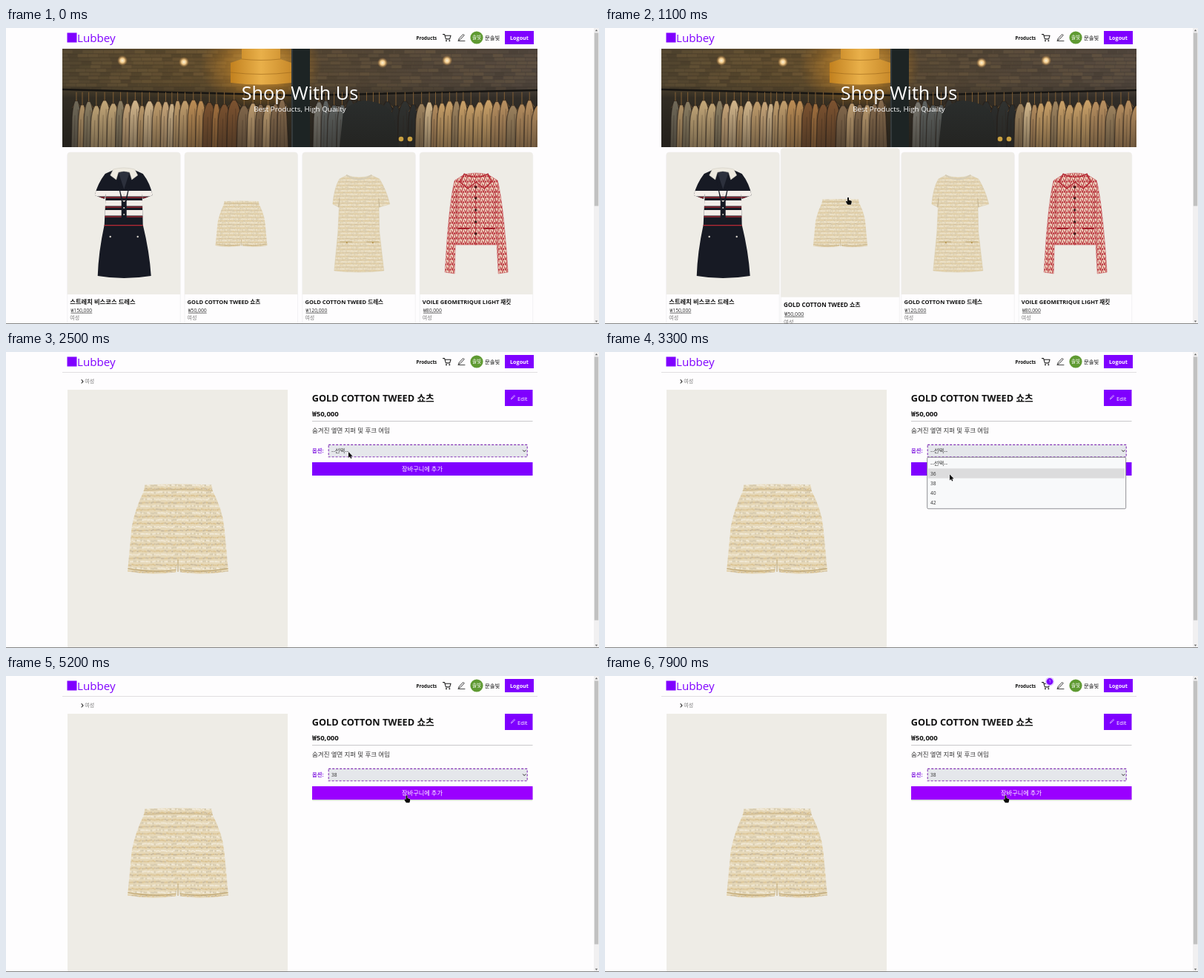
An HTML page for the animation above (8 s loop, 800 by 400 pixels).

```html
<!DOCTYPE html>
<html lang="ko">
<head>
<meta charset="utf-8">
<title>Shop demo</title>
<style>
  html, body { margin: 0; width: 100%; height: 100%; overflow: hidden; background: #fefdfe; }
  svg { display: block; width: 800px; height: 400px; }
  text { font-family: "Open Sans", "Noto Sans CJK KR", "Noto Sans CJK", sans-serif; fill: #111; white-space: pre; }
  .b { font-weight: 700; }
  .u { text-decoration: underline; }
  .mid { text-anchor: middle; }
  .line { fill: none; stroke-linecap: round; stroke-linejoin: round; }
</style>
</head>
<body>
<svg id="stage" viewBox="0 0 800 400"></svg>
<script>
const PURPLE = '#7f00ff', HOVER = '#9a00ff', DURATION = 8000, STEP = 100;

const text = (x, y, size, str, fill = '#111', cls = '', extra = '') =>
  `<text x="${x}" y="${y}" font-size="${size}" class="${cls}" style="fill:${fill}" ${extra}>${str}</text>`;
const rect = (x, y, w, h, fill, extra = '') =>
  `<rect x="${x}" y="${y}" width="${w}" height="${h}" fill="${fill}" ${extra}/>`;
const path = (d, fill, extra = '') => `<path d="${d}" fill="${fill}" ${extra}/>`;
const line = (d, color, width = 1, extra = '') =>
  `<path class="line" d="${d}" stroke="${color}" stroke-width="${width}" ${extra}/>`;
const dot = (x, y, r, fill, extra = '') => `<circle cx="${x}" cy="${y}" r="${r}" fill="${fill}" ${extra}/>`;
const group = (id, body, extra = '') => `<g id="${id}" ${extra}>${body}</g>`;

function seeded(seed) {
  return () => (seed = (seed * 16807) % 2147483647) / 2147483647;
}

// ---------- garments, in the local coordinates of a 152.5 x 192 picture ----------
const SHORTS = 'M53.5 66Q76 65 100 66L100.3 70Q107 82 108.5 95L111.4 126Q94 129 78 126.5L76.5 119L75 126.5Q58 129 41.6 126L44.5 95Q47 82 53 70Z';
const TWEED_DRESS = 'M60 31Q76 37 93 31L104 36Q113 50 118 70L104 74L103 66L104 108L110 160Q76 164 43 160L48 108L50 66L49 74L41 70Q43 48 50 36Z';
const JACKET = 'M60 30Q76 26 92 30L105 38Q113 70 119 162L106 164L102 88L104 125L48 125L49 88L47 164L34 162Q39 70 47 38Z';
const NAVY_DRESS = 'M62 24Q76 30 91 24L102 29Q112 42 115 58L102 63L101 56L102 98Q111 135 113 167Q76 173 41 167Q42 135 50 98L52 56L50 63L37 58Q41 42 51 29Z';

function tweed() {
  const rand = seeded(41);
  let out = rect(0, 0, 24, 19.2, '#e6d8b8');
  for (let row = 0; row < 8; row++) {
    const y = row * 2.4 + 0.7;
    for (let x = 0; x < 24; x += 1.2) {
      const color = row % 2 ? (rand() < .7 ? '#f4eee0' : '#cfc5ad') : (rand() < .6 ? '#d8bd88' : '#c2b194');
      out += rect(x.toFixed(1), (y + rand() * .8).toFixed(2), (0.7 + rand() * .5).toFixed(2), .9, color);
    }
  }
  return out;
}

const defs = `<defs>
  <pattern id="tweed" width="24" height="19.2" patternUnits="userSpaceOnUse">${tweed()}</pattern>
  <pattern id="zigzag" width="6" height="7" patternUnits="userSpaceOnUse">${rect(0, 0, 6, 7, '#f0dcc6')}
    ${line('M0 0L2 5.5L4 0M3.4 7L5 3.5L6 6', '#b5222f', 1.1)}</pattern>
  <clipPath id="navyClip"><path d="${NAVY_DRESS}"/></clipPath>
  <clipPath id="heroClip"><rect x="76" y="28" width="641" height="133"/></clipPath>
  <linearGradient id="wall"><stop offset="0" stop-color="#594b33"/><stop offset=".3" stop-color="#6b5430"/>
    <stop offset=".47" stop-color="#7a5a2a"/><stop offset=".54" stop-color="#5d4d38"/><stop offset="1" stop-color="#5a4e44"/></linearGradient>
  <linearGradient id="shade" x2="0" y2="1"><stop offset="0" stop-color="#201f1c" stop-opacity=".1"/>
    <stop offset=".36" stop-color="#201f1c" stop-opacity=".15"/><stop offset=".5" stop-color="#201f1c" stop-opacity=".7"/>
    <stop offset="1" stop-color="#201f1c" stop-opacity=".85"/></linearGradient>
  <linearGradient id="fade" x2="0" y2="1"><stop offset="0" stop-color="#1d1a16" stop-opacity="0"/>
    <stop offset="1" stop-color="#1d1a16" stop-opacity=".45"/></linearGradient>
  <radialGradient id="glow"><stop offset="0" stop-color="#ffcf68"/><stop offset=".5" stop-color="#dc962d" stop-opacity=".75"/>
    <stop offset="1" stop-color="#c87c1a" stop-opacity="0"/></radialGradient>
  <linearGradient id="lamp"><stop offset="0" stop-color="#c2811f"/><stop offset=".5" stop-color="#e9b04a"/><stop offset="1" stop-color="#c98a2a"/></linearGradient>
  <radialGradient id="spot"><stop offset="0" stop-color="#fff4d8"/><stop offset=".45" stop-color="#f0c888"/>
    <stop offset="1" stop-color="#b07a3a" stop-opacity="0"/></radialGradient>
</defs>`;

const shorts = path(SHORTS, 'url(#tweed)') +
  line('M53 70Q76 68.5 100.3 70', '#cdb98f', .6) +
  line('M76.5 118V126M42 124Q58 127 75 125M78 125Q94 127 111 124', '#bfa672', .6);

const tweedDress = path(TWEED_DRESS, 'url(#tweed)', 'stroke="#d3c4a0" stroke-width=".4"') +
  line('M60 31Q76 42 93 31', '#d5ccb6', 2) + line('M50 62L49 74M103 62L104 74', '#b8a684', .7) +
  line('M51 121H67M87 121H103', '#bfa873', 1) + dot(60, 122, 1.1, '#b3914a') + dot(95, 122, 1.1, '#b3914a');

const jacket = path(JACKET, 'url(#zigzag)', 'stroke="#c4525a" stroke-width=".5"') +
  line('M75.5 45V125M49 50V88M102 50V88', '#a8252f', .8) +
  path('M60 29Q76 38 92 29L97 40L87 49L76 40L65 49L54 40Z', 'url(#zigzag)', 'stroke="#b0202c" stroke-width="1.2"') +
  line('M52 103H66M87 103H101', '#a31f2a', 2) +
  [47, 62, 78, 94, 110].map(y => dot(75.5, y, 1.7, '#3b1d1d')).join('');

const navyStripes = [52, 65, 78].map(y => rect(36, y, 81, 7.5, '#f3eee9') + rect(36, y + 8.5, 81, 1.2, '#b72a35')).join('');
const navyDress = `<g clip-path="url(#navyClip)">${rect(30, 15, 95, 165, '#171a24')}${navyStripes}` +
  rect(36, 98, 81, 1.3, '#b72a35') + '</g>' +
  path('M66 30L75 66H78L87 30L80 66V92H73V66Z', '#171a24') + path('M69 27L76.5 50L84 27Q76 24 69 27Z', '#2c303c') +
  path('M62 23Q76 19 91 23L95 31L87 37L84 27Q76 24 69 27L66 37L58 31Z', '#eeeae0', 'stroke="#c9c4b8" stroke-width=".5"') +
  [57, 66, 75, 84].map(y => dot(76.5, y, 1, '#d8d4cc')).join('') +
  dot(58, 114, 1.2, '#d8d4cc') + dot(95, 114, 1.2, '#d8d4cc');

// ---------- shop page ----------
function clothes(from, to, zones, seed) {
  const rand = seeded(seed);
  let out = '';
  for (let x = from; x < to;) {
    const colors = zones.filter(z => x >= z[0]).pop()[1].split(' ');
    const color = colors[Math.floor(rand() * colors.length)];
    const w = 9 + rand() * 7, top = 97 + rand() * 8, mid = x + w / 2, right = x + w + 1;
    out += line(`M${mid} 87V${top}M${x} ${top + 9}L${mid} ${top - 1}L${right} ${top + 9}`, '#8a6436', .9) +
      path(`M${mid - 2} ${top}h4Q${right - 1} ${top + 7} ${right} ${top + 22}L${right + 2} 162H${x - 2}L${x - 1} ${top + 22}Q${x} ${top + 7} ${mid - 2} ${top}Z`,
        color, 'stroke="#241c16" stroke-opacity=".6" stroke-width="1.3"') +
      line(`M${mid + 2} ${top + 12}L${mid + 3} 161M${mid - 2} ${top + 20}L${mid - 3} 161`, '#2c2018', 1, 'opacity=".3"');
    x += w * .85;
  }
  return out;
}

function bricks() {
  const rand = seeded(7);
  let out = '';
  for (let y = 30; y < 84; y += 5) {
    out += line(`M76 ${y}H717`, '#2b241b', .8, 'opacity=".35"');
    for (let x = 76 + rand() * 12; x < 717; x += 14) {
      out += rect(x, y, 13, 4.4, rand() < .5 ? '#2b241b' : '#9a7b4c', `opacity="${(rand() * .2).toFixed(2)}"`);
    }
  }
  return out;
}

const lamp = `<ellipse cx="344" cy="50" rx="82" ry="60" fill="url(#glow)" opacity=".6"/>` +
  path('M318 24H370V42L385 47V74Q344 79 303 74V47L318 42Z', 'url(#lamp)') +
  line('M318 42Q344 45 370 42M303 60Q344 65 385 60', '#9a661c', 1, 'opacity=".6"');

const hero = `<g clip-path="url(#heroClip)">${rect(76, 28, 641, 133, 'url(#wall)')}${bricks()}${rect(76, 28, 641, 133, 'url(#shade)')}` + lamp +
  [[157, 44], [240, 46], [508, 47], [595, 44]].map(p => dot(p[0], p[1], 7, 'url(#spot)')).join('') +
  line('M76 83L385 91M410 91L717 84', '#171512', 2.5) +
  clothes(90, 375, [[0, '#6f6858 #b39468 #8a7d62 #c2a678'], [155, '#d0b48a #bf9c6c #c8a67a'], [235, '#a3713f #7b5230 #b98b54'], [305, '#a98c69 #84694c #bd9c70']], 77) +
  clothes(416, 717, [[0, '#77756d #a08563 #5d615f'], [450, '#2c2e2d #303230'], [545, '#c9a068 #b78f60 #d2b78c #a08560']], 19) +
  path('M450 161L455 112Q468 100 482 98Q512 100 522 116L530 161Z', '#2a2d2c') +
  rect(76, 100, 641, 61, 'url(#fade)') +
  rect(385, 28, 25, 133, '#1d2424') + rect(385, 28, 2, 133, '#343a3c') +
  dot(533, 150, 3.3, '#c9a040') + dot(545, 150, 3.3, '#c9a040') + '</g>' +
  text(396.5, 96.5, 25.2, 'Shop With Us', '#fff', 'mid') +
  text(396.5, 113, 9.85, 'Best Products, High Quailty', '#fff', 'mid');

const products = [
  [82.7, navyDress, '스트레치 비스코스 드레스', '150,000', 8.3],
  [241, shorts, 'GOLD COTTON TWEED 쇼츠', '50,000', 7.6],
  [399.8, tweedDress, 'GOLD COTTON TWEED 드레스', '120,000', 7.6],
  [558.2, jacket, 'VOILE GEOMETRIQUE LIGHT 재킷', '80,000', 7.6]
];
const cards = products.map(([x, art, name, price, size], i) => `<g transform="translate(${x} 168)">` + group('card' + i,
  rect(0, 0, 152.5, 236, '#fefdfe', 'rx="4" stroke="#eeedef" stroke-width=".7"') +
  path('M0 192V4Q0 0 4 0H148.5Q152.5 0 152.5 4V192Z', '#eeece6') + art +
  text(3.6, 204.5, size, name, '#111', 'b') +
  text(4.8, 215.8, 6.8, '₩' + price, '#333', 'u') +
  text(3.6, 226.3, 7, '여성', '#777')) + '</g>').join('');

// ---------- product page ----------
const pencil = (x, y, k, color) =>
  line('M1 8L2 5.5L7.5 0L9 1.5L3.5 7Z', color, 1, `transform="translate(${x} ${y}) scale(${k})"`);

const ROWS = ['--선택--', '36', '38', '40', '42'], ROW_TOP = 144.6, ROW_H = 13.2;
const menu = group('menu',
  rect(434.7, 142.3, 268, 69.5, '#f8f9fa', 'rx="1.5" stroke="#85858a" stroke-width=".9"') +
  rect(436, ROW_TOP, 265, ROW_H, '#dcdcdd', 'id="mark"') +
  ROWS.map((s, i) => text(439, 153.4 + i * ROW_H, i ? 6.7 : 7.4, s, '#333')).join(''));

const detail = line('M102 37.5L104 39.8L102 42', '#222', 1.1) + text(106.3, 42.4, 7, '여성', '#777') +
  rect(83, 51, 297, 349, '#eeece6') + `<g transform="translate(83 51) scale(1.948)">${shorts}</g>` +
  text(412.8, 67, 12.7, 'GOLD COTTON TWEED 쇼츠', '#111', 'b') +
  text(413, 87.2, 9.6, '₩50,000', '#111', 'b') +
  rect(413, 93, 297.5, 1, '#c9c8ca') +
  text(413, 109, 8.5, '숨겨진 옆면 지퍼 및 후크 여밈', '#333') +
  rect(673, 51, 37.5, 22, PURPLE) + pencil(681, 58.5, .62, '#fff') + text(690, 65.6, 7.6, 'Edit', '#fff') +
  text(413, 136.2, 7.3, '옵션:', '#8a2be2', 'b') +
  rect(435.2, 125.4, 268, 16.4, '#e5e7eb', 'stroke="#8334b5" stroke-width="1.1" stroke-dasharray="3 2"') +
  text(439, 136.3, 7.4, '', '#333', '', 'id="choice"') + line('M697.5 132.8L699.2 134.6L701 132.8', '#222', 1) +
  rect(413, 150.4, 297.5, 18, '#000', 'id="shadow" opacity=".16" rx="1"') +
  rect(413, 149, 297.5, 18, PURPLE, 'id="button"') +
  text(561.5, 161.2, 8.2, '', '#fff', 'mid', 'id="label"') + menu;

// ---------- shared chrome ----------
const header = rect(82.5, 6.5, 13, 13, PURPLE) + text(96, 19, 15.2, 'Lubbey', PURPLE) +
  text(553.6, 16, 6.25, 'Products', '#111', 'b') +
  line('M589.5 8.6H591.6L593.4 14.9H598.6L600 10.3H592.2', '#222', 1.1) + dot(594, 17.2, 1, '#222') + dot(598.3, 17.2, 1, '#222') +
  pencil(609.5, 8.5, .98, '#333') + line('M610 17.5H619', '#333', .9) +
  dot(635, 13, 8.6, '#5f9a32') + text(635, 15.4, 6.6, '솔빛', '#fff', 'mid') +
  text(646, 15.8, 7.3, '문솔빛', '#111') +
  rect(673, 4, 39, 18, PURPLE) + text(692.5, 16, 7.2, 'Logout', '#fff', 'b mid') +
  group('badge', dot(600, 7.5, 6, '#dcc4ff') + dot(600, 7.5, 4.4, PURPLE) + text(600, 9.4, 5.4, '1', '#fff', 'mid'));

const scrollbar = rect(793, 0, 7, 400, '#f1f0f1') + rect(793.8, 6.5, 5.4, 234, '#c1c1c1', 'id="thumb"') +
  path('M794.8 4.2L796.5 2L798.2 4.2Z', '#666') + path('M794.8 395.5L796.5 397.7L798.2 395.5Z', '#666') +
  rect(0, 399, 800, 1, '#858585');

const banner = group('banner', rect(0, 0, 800, 22, '#00ff00') +
  rect(342.5, 7.5, 7.2, 7.2, '#3f9f4a', 'rx="1" stroke="#2c5a34" stroke-width=".7"') + line('M344 11L345.7 13L349.5 8', '#fff', 1.1) +
  text(353, 13.4, 7.2, '제품이 장바구니에 추가되었습니다.', '#5a3a10'));

const ARROW = 'M0 0V8L1.9 6.3L3.1 9L4.4 8.4L3.2 5.8H5.6Z';
const HAND = 'M-1 .4Q0 -.8 1 .4V3.6L4 4.4Q5 4.7 4.8 5.8L4.2 8.8Q4 9.8 3.2 9.8H0Q-.8 9.8 -1.2 9L-3 6Q-3.4 5 -2.4 4.8L-1 5.6Z';
const edge = 'stroke="#fff" stroke-width=".7" paint-order="stroke"';
const cursor = group('cursor', path(ARROW, '#0a0a0a', `id="arrow" ${edge}`) + path(HAND, '#0a0a0a', `id="hand" ${edge}`) +
  group('blocked', dot(4.3, 9, 3, '#fff', 'stroke="#d0202c" stroke-width="1.2"') + line('M2.3 7L6.3 11', '#d0202c', 1.2)));

document.getElementById('stage').innerHTML = defs + rect(0, 0, 800, 400, '#fefdfe') +
  group('shop', hero + cards) + group('detail', rect(76, 27, 641, .8, '#d9d8da') + detail) +
  header + scrollbar + banner + cursor;

const el = id => document.getElementById(id);
const show = (id, on) => el(id).setAttribute('display', on ? 'inline' : 'none');
const clamp = v => Math.min(1, Math.max(0, v));

// time, x, y
const track = [
  [500, 792, 300], [600, 690, 288], [700, 545, 268], [800, 450, 250], [900, 382, 238], [1000, 342, 231], [1100, 328, 229],
  [1900, 328, 229], [2200, 405, 170], [2500, 462, 135], [3000, 462, 137], [3300, 465, 165.5], [3500, 465, 178],
  [4400, 465, 178], [4700, 508, 172], [5000, 540.5, 161.5]
];
// card, pointer enters, pointer leaves
const hovers = [[3, 600, 700], [2, 700, 900], [1, 900, 1600]];

function pointer(t) {
  const i = track.findIndex(k => k[0] > t);
  if (i < 0) return track[track.length - 1].slice(1);
  if (i === 0) return track[0].slice(1);
  const a = track[i - 1], b = track[i], k = (t - a[0]) / (b[0] - a[0]);
  return [a[1] + (b[1] - a[1]) * k, a[2] + (b[2] - a[2]) * k];
}

function render(t) {
  const [x, y] = pointer(t), shopping = t < 1600, adding = t >= 6200 && t < 7600;
  const over = t >= 4900, chosen = t >= 4100;
  show('shop', shopping);
  show('detail', !shopping);
  el('thumb').setAttribute('height', shopping ? 234 : 356);

  for (const [card, enter, leave] of hovers) {
    const k = 1 + .05 * clamp((t - enter) / 200) * (1 - clamp((t - leave) / 200));
    el('card' + card).setAttribute('transform', `translate(76 115) scale(${k}) translate(-76 -115)`);
  }

  show('menu', t >= 2800 && t < 4100);
  const row = Math.max(0, Math.floor((y - ROW_TOP) / ROW_H));
  el('mark').setAttribute('y', ROW_TOP + row * ROW_H - .4);
  el('choice').textContent = chosen ? '38' : ROWS[0];
  el('choice').setAttribute('font-size', chosen ? 6.7 : 7.4);
  el('button').setAttribute('fill', over ? HOVER : PURPLE);
  show('shadow', over);
  el('label').textContent = adding ? '추가중...' : '장바구니에 추가';

  show('banner', t >= 6600 && t < 7600);
  show('badge', t >= 6700);

  const hand = (t >= 600 && shopping) || (over && !adding);
  show('cursor', t >= 500);
  show('hand', hand);
  show('arrow', !hand);
  show('blocked', adding);
  el('cursor').setAttribute('transform', `translate(${x} ${y})`);
}

const start = performance.now();
function tick() {
  const t = (performance.now() - start) % DURATION;
  render(Math.floor(t / STEP) * STEP);
  requestAnimationFrame(tick);
}
tick();
</script>
</body>
</html>
```
